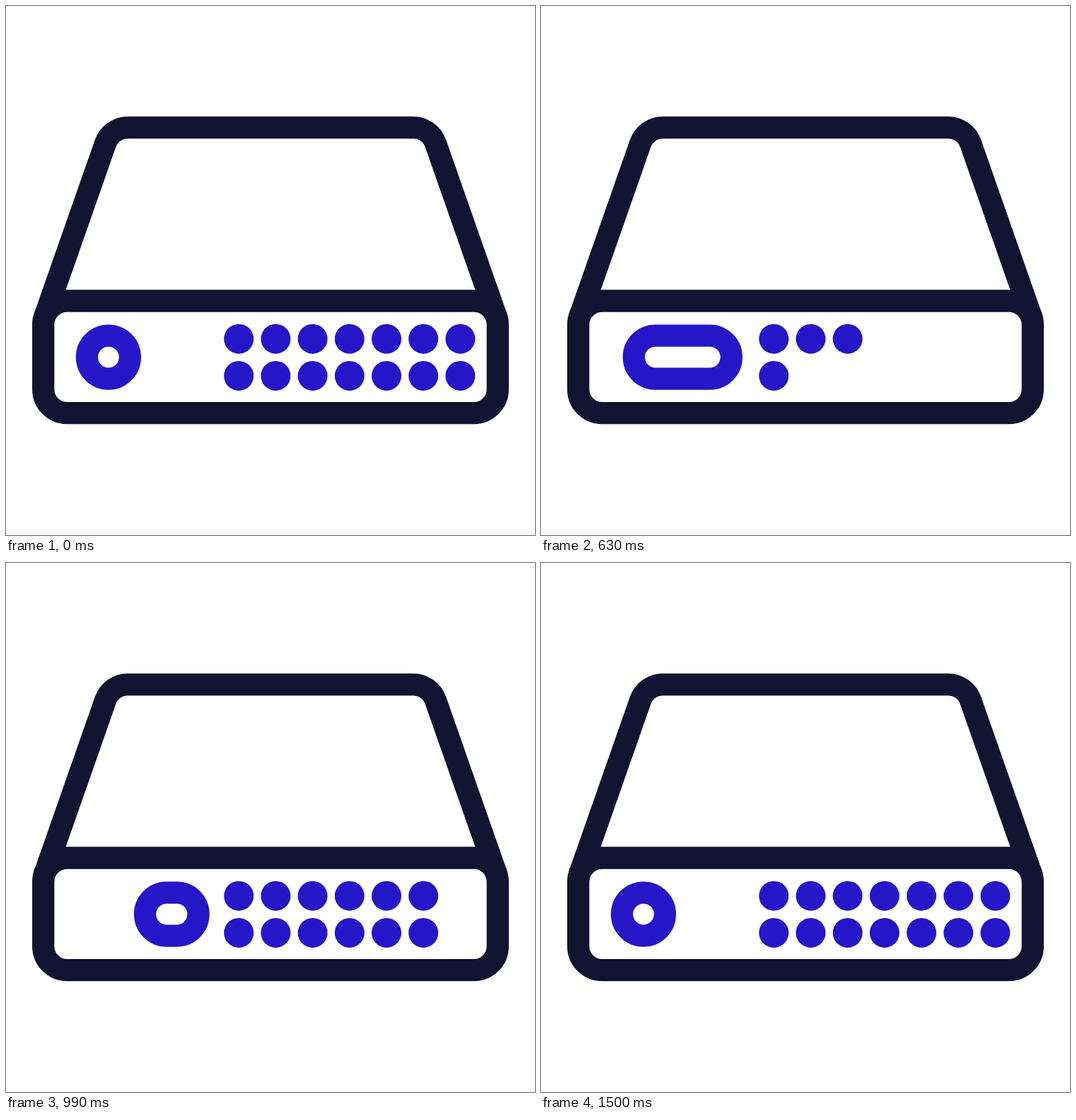
These frames come from a looping animation (748x748 px, 1530 ms). An HTML page:

```html
<!DOCTYPE html>
<html lang="en">
<head>
<meta charset="utf-8">
<title>Server activity</title>
<style>
  html, body { margin: 0; width: 100%; height: 100%; overflow: hidden; background: #fff; }
  svg { display: block; width: 100vw; height: 100vh; }
</style>
</head>
<body>
<svg viewBox="0 0 748 748">
  <g fill="none" stroke="#121331" stroke-width="31.3">
    <rect x="52.7" y="417" width="642.6" height="158.6" rx="33.7"/>
    <path d="M54.6 439.7 L140.5 194.4 A33.6 33.6 0 0 1 172.4 171.8 H575.6 A33.6 33.6 0 0 1 607.5 194.4 L693.4 439.7"/>
  </g>
  <rect id="pill" y="466.1" height="61" rx="30.5" fill="none" stroke="#2516c7" stroke-width="31.3"/>
  <g id="dots" fill="#2516c7"></g>
</svg>
<script>
const STEP = 30, LOOP = 1530;
const COLS = 7, TRAVEL = 96.7;

// Keys are [step, value] pairs, eased in and out between neighbours.
const tracks = {
  right: [[10, 0], [22.25, 1], [37.75, 1], [50, 0]],
  left: [[17.75, 0], [30, 1], [42.25, 0]],
  rows: [
    [[10, 1], [17.5, 0.33], [30, 1], [40, 0.67], [50, 1]],
    [[10, 1], [21.9, 0], [30, 1], [40, 0.47], [50, 1]]
  ]
};

const pill = document.getElementById("pill");
const group = document.getElementById("dots");

const rows = [470.7, 522.9].map(y =>
  Array.from({ length: COLS }, (_, i) => {
    const dot = document.createElementNS("http://www.w3.org/2000/svg", "circle");
    dot.setAttribute("cx", 329.2 + 52.2 * i);
    dot.setAttribute("cy", y);
    dot.setAttribute("r", 21);
    group.appendChild(dot);
    return dot;
  })
);

function valueAt(keys, s) {
  const next = keys.findIndex(k => k[0] > s);
  if (next === 0) return keys[0][1];
  if (next < 0) return keys[keys.length - 1][1];
  const [s0, v0] = keys[next - 1], [s1, v1] = keys[next];
  const u = (s - s0) / (s1 - s0);
  return v0 + (v1 - v0) * u * u * (3 - 2 * u);
}

function draw(ms) {
  const s = Math.floor((ms % LOOP + 0.01) / STEP);
  const left = TRAVEL * valueAt(tracks.left, s);
  const right = TRAVEL * valueAt(tracks.right, s);
  pill.setAttribute("x", 114.4 + left);
  pill.setAttribute("width", 61 + right - left);

  rows.forEach((row, r) => {
    const reach = (COLS - 1) * valueAt(tracks.rows[r], s) + 1e-6;
    row.forEach((dot, i) => dot.setAttribute("visibility", i <= reach ? "visible" : "hidden"));
  });
}

let start;
function tick(now) {
  if (start === undefined) start = now;
  draw(now - start);
  requestAnimationFrame(tick);
}
draw(0);
requestAnimationFrame(tick);
</script>
</body>
</html>
```
